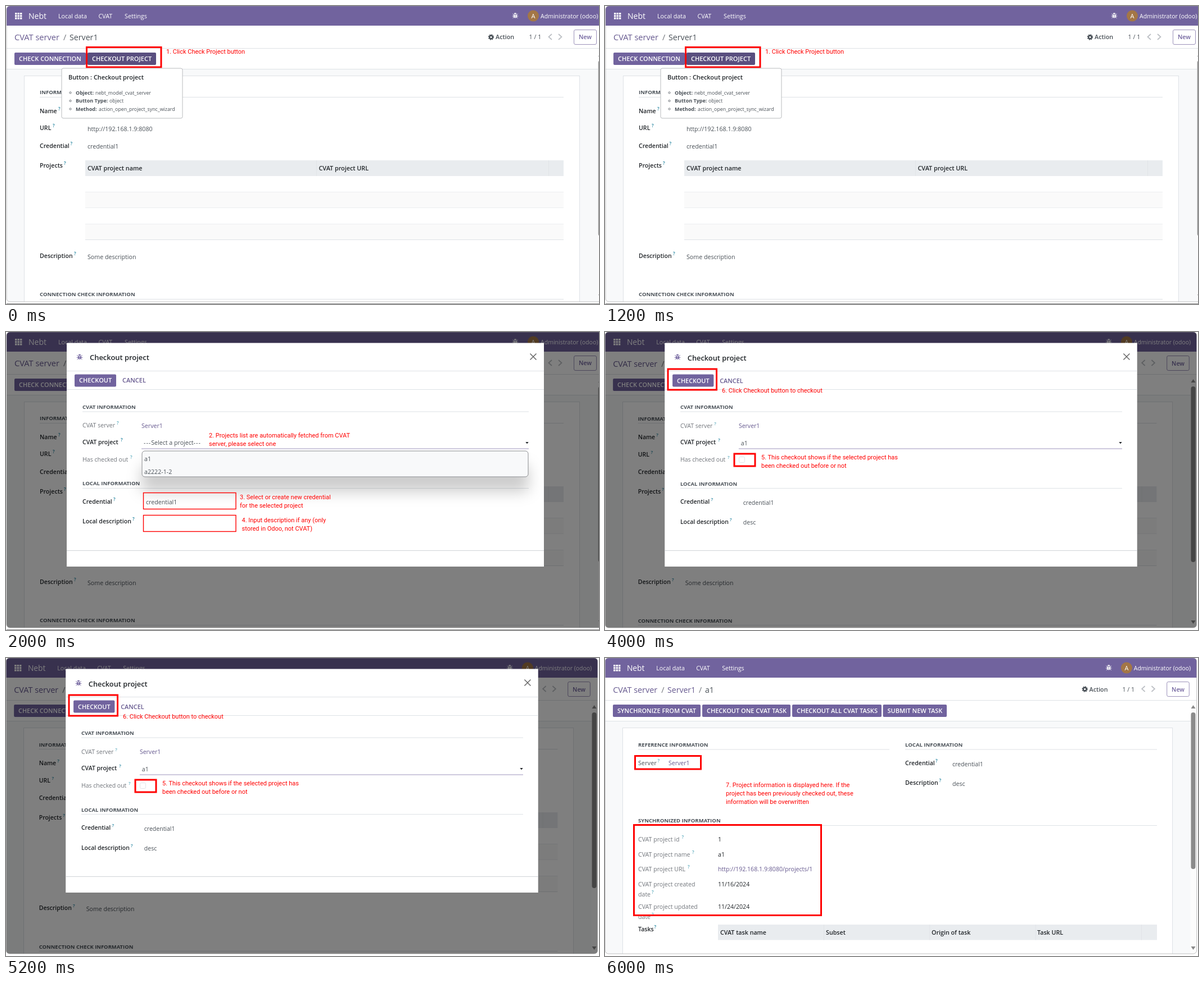
An HTML page that plays this animation: 1055 px wide and 531 px high, repeating every 8 s.

```html
<!DOCTYPE html>
<html lang="en">
<head>
<meta charset="utf-8">
<title>Checkout walkthrough</title>
<style>
  html, body { margin: 0; width: 100%; height: 100%; overflow: hidden; background: #fff; }
  svg { display: block; font-family: "Open Sans", "Noto Sans", sans-serif; }
  .note { font-family: Roboto, "Liberation Sans", sans-serif; }
  .menu { filter: drop-shadow(0 26px 13px rgba(0, 0, 0, .2)); }
</style>
</head>
<body>
<svg id="stage" width="1055" height="531" viewBox="0 0 1055 531"></svg>
<script>
const PURPLE = '#71639e', LINK = '#66598f', INK = '#212529', BODY = '#495057',
      MUTED = '#72767c', RULE = '#dee2e6', RED = '#f00', STEP = 2000;

let out = '', scale = 1, shift = 0, drop = 0;

// The later screens are slightly narrower: map x and text size through this.
const fit = narrow => [scale, shift, drop] = narrow ? [.99, -.7, .4] : [1, 0, 0];
const native = () => [scale, shift, drop] = [1, 0, 0];
const X = x => x * scale + shift;

function text(x, mid, str, size = 10.65, fill = BODY, weight = 400, more = '') {
  const s = size * scale;
  out += `<text x="${X(x)}" y="${mid + drop + s * .36}" font-size="${s}" fill="${fill}" font-weight="${weight}" ${more}>${str}</text>`;
}
function box(x1, y1, x2, y2, fill, more = '') {
  out += `<rect x="${X(x1)}" y="${y1}" width="${(x2 - x1) * scale}" height="${y2 - y1}" fill="${fill}" ${more}/>`;
}
const frame = (x1, y1, x2, y2, w) => box(x1, y1, x2, y2, 'none', `stroke="${RED}" stroke-width="${w}"`);
const rule = (x1, x2, y, color = RULE) => box(x1, y, x2, y + 1, color);
const path = (x, y, d, more) => out += `<path transform="translate(${X(x)} ${y})" d="${d}" ${more}/>`;
const line = (x, y, d, color, w) => path(x, y, d, `fill="none" stroke="${color}" stroke-width="${w}"`);
const caps = (x, y, str) => text(x, y, str, 9.55, BODY, 700);
const strong = (x, y, str, size = 10.65, fill = INK) => text(x, y, str, size, fill, 600);

function heading(x1, x2, y, str) {
  caps(x1, y, str);
  rule(x1, x2, y + 8);
}
function label(x, y, str, helpX, muted) {
  text(x, y, str, 10.6, muted ? MUTED : INK, muted ? 400 : 600);
  if (helpX) text(helpX, y - 4, '?', 8, muted ? '#5aaabd' : '#1a7f9c', 600);
}
function button(x1, x2, y, str, fill = PURPLE) {
  box(x1, y, x2, y + 22, fill, 'rx="2"');
  strong(x1 + 8, y + 11, str, 11, '#fff');
}
function note(x, y, ...lines) {
  lines.forEach((str, i) => text(x, y + i * 15, str, 10.97, RED, 400, 'class="note"'));
}
function bug(x, y, color) {
  path(x, y, 'M-2.4 -2.4a2.4 2.4 0 0 1 4.8 0zM-2.8 -1.6H-.4V4.6A3 3 0 0 1 -2.8 1.6zM2.8 -1.6H.4V4.6A3 3 0 0 0 2.8 1.6z', `fill="${color}"`);
  line(x, y, 'M-2.5 -1L-4.6 -3M2.5 -1L4.6 -3M-2.5 1H-5.2M2.5 1H5.2M-2.3 2.6L-4.4 4.6M2.3 2.6L4.4 4.6', color, 1);
}

// Navigation bar, control panel and page background shared by all screens
function shell(thumbEnd) {
  box(1, 0, 1064, 527, '#fff');
  box(1, 112, 1053, 527, '#f8f9fa');
  box(1, 0, 1064, 35, PURPLE);
  for (let i = 0; i < 9; i++) {
    const x = 16 + i % 3 * 4.5, y = 12 + Math.floor(i / 3) * 4.2;
    box(x, y, x + 3.4, y + 3.2, '#fff');
  }
  text(40, 18, 'Nebt', 14, '#fff');
  text(93, 18, 'Local data', 10.75, '#fff');
  text(164.5, 18, 'CVAT', 10.75, '#fff');
  text(211, 18, 'Settings', 10.75, '#fff');
  bug(906, 17, '#fff');
  out += `<circle cx="${X(938)}" cy="17.6" r="10" fill="#a37646"/>`;
  text(938, 18, 'A', 11, '#fff', 400, 'text-anchor="middle"');
  text(951, 18, 'Administrator (odoo)', 10.55, '#fff');

  text(15, 56, 'CVAT server', 14.6, LINK);
  text(102, 56, '/', 14.4, MUTED);
  out += `<g transform="translate(${X(863)} 55.5)" fill="none" stroke="${BODY}"><circle r="2.8" stroke-width="2.4"/><circle r="4.3" stroke-width="1.8" stroke-dasharray="1.8 1.577"/></g>`;
  strong(871, 55.5, 'Action', 10.8, BODY);
  text(930.5, 55.5, '1 / 1', 10.8);
  line(968, 55, 'M3 -5L-2.5 0L3 5', '#bcbfc4', 1.7);
  line(986, 55, 'M-3 -5L2.5 0L-3 5', '#bcbfc4', 1.7);
  box(1010.5, 42.5, 1050.5, 68.5, '#fff', 'rx="2.5" stroke="#9c92ba"');
  strong(1019, 55.5, 'New', 10.7, PURPLE);
  rule(1, 1064, 75);
  rule(1, 1064, 112);

  box(32.5, 124.5, 1020.5, 540, '#fff', `stroke="${RULE}"`);
  box(1053, 76, 1064, 527, '#fcfcfc');
  box(1053.7, 97, 1061.8, thumbEnd, '#8b8b8b', 'rx="4"');
  path(1057.8, 87, 'M-4 3L0 -3L4 3z', 'fill="#8b8b8b"');
  path(1057.8, 517, 'M-4 -3L0 3L4 -3z', 'fill="#8b8b8b"');
}

function serverPage() {
  shell(410);
  text(113, 56, 'Server1', 14.2, BODY);
  button(15, 142, 83, 'CHECK CONNECTION');
  button(145, 267, 83, 'CHECKOUT PROJECT', '#5a4f7f');
  heading(60, 992, 154, 'INFORMATION');
  label(60, 187, 'Name', 93);
  label(60, 217.5, 'URL', 83);
  label(60, 249, 'Credential', 114.5);
  label(60, 284, 'Projects', 103);
  text(145, 219, 'http://192.168.1.9:8080');
  text(145, 250.5, 'credential1');
  box(141, 275, 992, 303, '#e9ecef');
  for (const x of [552, 965]) box(x, 275, x + 1, 303, '#e1e4e8');
  strong(145, 289, 'CVAT project name', 10.8);
  strong(556.5, 289, 'CVAT project URL', 10.8);
  for (const y of [331, 388]) {
    box(141, y, 992, y + 29, '#fafafa');
    rule(141, 992, y, '#eceef0');
    rule(141, 992, y + 28, y > 350 ? RULE : '#eceef0');
  }
  label(60, 445, 'Description', 121);
  text(145, 447, 'Some description');
  heading(60, 992, 514, 'CONNECTION CHECK INFORMATION');
}

function tooltip() {
  box(99, 111, 314, 200, '#fff', 'rx="3" stroke="#b9bbbe"');
  strong(111, 127, 'Button : Checkout project', 10.9);
  [['Object:', 159, 'nebt_model_cvat_server'],
   ['Button Type:', 184, 'object'],
   ['Method:', 165, 'action_open_project_sync_wizard']].forEach(([key, x, value], i) => {
    const y = 154.5 + i * 14.5;
    out += `<circle cx="114.5" cy="${y}" r="1.6" fill="none" stroke="${BODY}" stroke-width=".8"/>`;
    text(124, y, key, 9, BODY, 700);
    text(x, y, value, 8.8);
  });
}

function dialog(project) {
  box(1, 0, 1064, 527, '#000', 'opacity=".5"');
  box(108, 19.5, 957, 418, '#fff');
  bug(131, 44.5, PURPLE);
  strong(149, 45.5, 'Checkout project', 12.95);
  line(938, 44, 'M-5.5 -5.5L5.5 5.5M5.5 -5.5L-5.5 5.5', '#666', 1.5);
  rule(108, 957, 69);
  button(122, 196, 75.5, 'CHECKOUT');
  strong(207, 86.5, 'CANCEL', 11, LINK);
  rule(108, 957, 102);
  heading(136, 930, 133.5, 'CVAT INFORMATION');
  label(136, 166.5, 'CVAT server', 197, true);
  text(241, 167, 'Server1', 10.65, LINK);
  label(136, 196, 'CVAT project', 204);
  text(245, 197.5, project);
  path(927, 197.5, 'M-2.7 -1.5H2.7L0 1.7z', `fill="${INK}"`);
  rule(241, 930, 207.5, '#9d93bb');
  label(136, 227, 'Has checked out', 221, true);
  heading(136, 930, 270, 'LOCAL INFORMATION');
  label(136, 301.8, 'Credential', 191);
  text(249, 303.5, 'credential1');
  label(136, 337.5, 'Local description', 225);
  rule(108, 957, 389, '#d0d3d7');
}

const footLine = () => rule(1, 1055, 530, '#808080');

const scenes = [
  () => {
    serverPage();
    frame(143.5, 73.5, 276, 109, 3);
    note(285, 81, '1. Click Check Project button');
    tooltip();
  },
  () => {
    const dashes = '<tspan letter-spacing="1">---</tspan>';
    serverPage();
    dialog(`${dashes}Select a project${dashes}`);
    note(361, 184, '2. Projects list are automatically fetched from CVAT', 'server, please select one');
    box(242, 212, 929, 258, '#f8f9fa', 'rx="5" stroke="#8b8d90" class="menu"');
    text(246, 225.7, 'a1');
    text(246, 248.7, 'a2222-1-2');
    frame(244.5, 286.5, 409, 315.5, 1.4);
    note(416, 294, '3. Select or create new credential', 'for the selected project');
    frame(244.5, 326.5, 409, 355.5, 1.4);
    note(419.5, 335, '4. Input description if any (only', 'stored in Odoo, not CVAT)');
  },
  () => {
    serverPage();
    dialog('a1');
    text(249, 339, 'desc');
    native();
    frame(112, 66, 198.5, 103, 3);
    note(208, 104, '6. Click Checkout button to checkout');
    box(238.5, 222.5, 248.5, 232.5, '#fff', 'rx="2" stroke="#e2e4e7"');
    frame(230, 217, 267, 239, 3);
    note(278, 223.5, '5. This checkout shows if the selected project has', 'been checked out before or not');
  },
  () => {
    shell(376);
    native();
    text(111, 56.8, 'Server1', 14.1, LINK);
    text(167, 56.8, '/', 14.2, MUTED);
    text(178, 56.8, 'a1', 14.1);
    button(14, 170, 83, 'SYNCHRONIZE FROM CVAT');
    button(173, 330, 83, 'CHECKOUT ONE CVAT TASK');
    button(333, 492, 83, 'CHECKOUT ALL CVAT TASKS');
    button(494.5, 608, 83, 'SUBMIT NEW TASK');

    heading(59, 506, 154.5, 'REFERENCE INFORMATION');
    text(59, 187.5, 'Server', 10.6, MUTED, 600);
    text(93.5, 183.5, '?', 8, '#5aaabd', 600);
    text(113, 187.5, 'Server1', 10.55, LINK);
    heading(534, 982, 154.5, 'LOCAL INFORMATION');
    label(534, 187.5, 'Credential', 588);
    text(618, 189, 'credential1', 10.55);
    label(534, 222, 'Description', 594.5);
    text(618, 224, 'desc', 10.55);
    note(215, 226.5, '7. Project information is displayed here. If the',
      'project has been previously checked out, these', 'information will be overwritten');

    heading(59, 982, 290, 'SYNCHRONIZED INFORMATION');
    [[323, 'CVAT project id', 136.5, '1'],
     [350, 'CVAT project name', 155, 'a1'],
     [376.5, 'CVAT project URL', 147, 'http://192.168.1.9:8080/projects/1'],
     [403.5, 'CVAT project created', 0, '11/16/2024'],
     [443.5, 'CVAT project updated', 0, '11/24/2024']].forEach(([y, name, helpX, value]) => {
      label(59, y, name, helpX, true);
      if (!helpX) label(59, y + 17.5, 'date', 83, true);
      text(201, y, value, 10.6, value.startsWith('http') ? LINK : INK);
    });
    label(59, 483.5, 'Tasks', 87.5);
    box(201, 475, 982, 502.5, '#e9ecef');
    ['CVAT task name', 'Subset', 'Origin of task', 'Task URL'].forEach((name, i) => {
      strong(205 + i * 188, 489, name, 10.7);
      box(389 + i * 188.3, 475, 390 + i * 188.3, 502.5, '#e1e4e8');
    });
    frame(53.5, 174.5, 170.5, 198, 3);
    frame(51.5, 297.5, 384.5, 458.5, 3);
  }
];

scenes.forEach((draw, i) => {
  const narrow = i > 1;
  fit(narrow);
  const shape = `x="${X(1)}" width="${1063 * scale}" height="527" rx="6"`;
  out += `<g class="scene" visibility="hidden"><clipPath id="win${i}"><rect ${shape}/></clipPath><g clip-path="url(#win${i})">`;
  draw();
  out += `</g><rect ${shape} fill="none" stroke="#9a9a9a" stroke-opacity=".6"/>`;
  if (!narrow) footLine();
  out += '</g>';
});
document.getElementById('stage').innerHTML = out;

const groups = [...document.querySelectorAll('.scene')];
const start = performance.now();
function tick() {
  const current = Math.floor((performance.now() - start) / STEP) % groups.length;
  groups.forEach((g, i) => g.setAttribute('visibility', i === current ? 'visible' : 'hidden'));
  requestAnimationFrame(tick);
}
tick();
</script>
</body>
</html>
```
